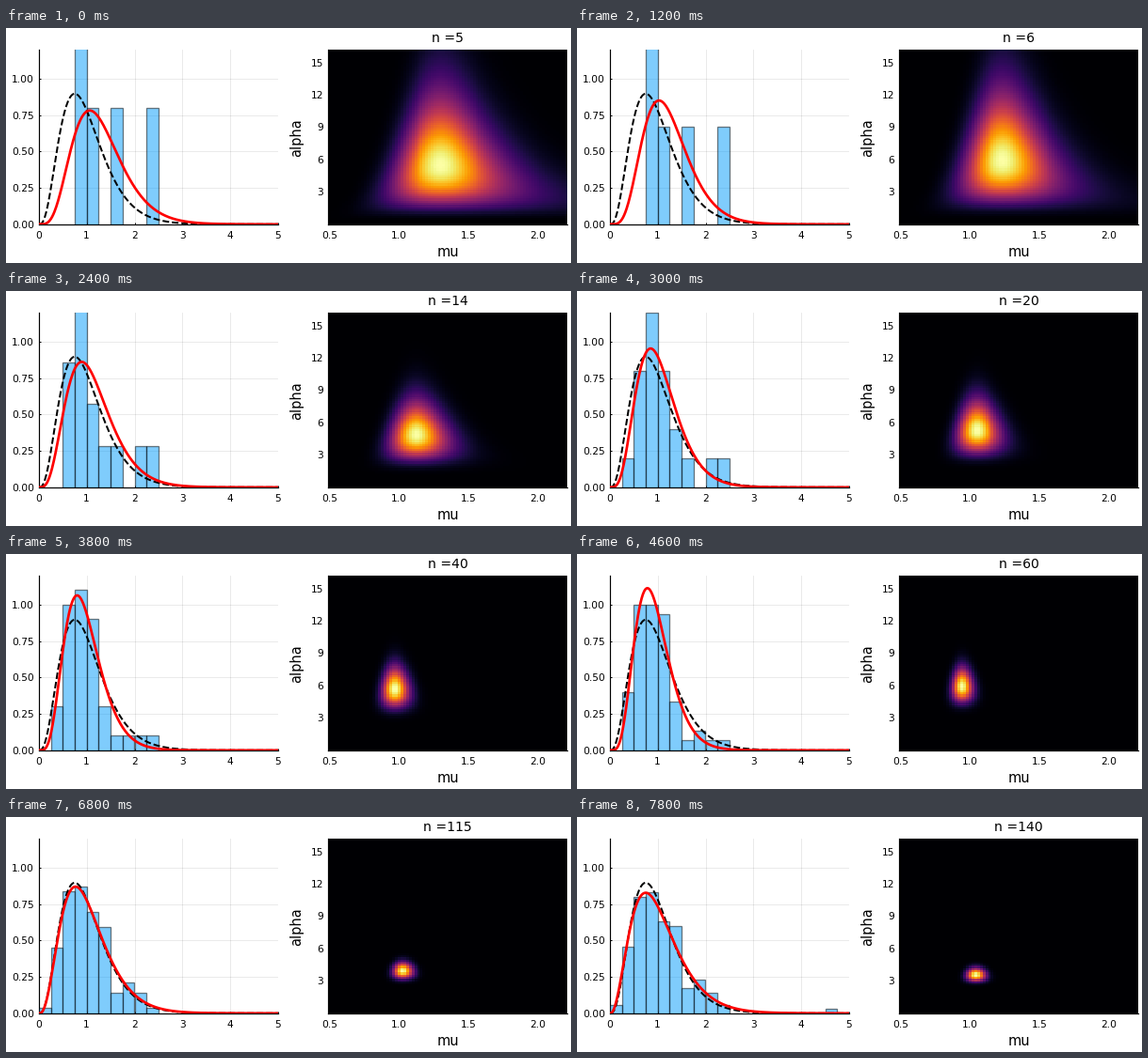
These frames come from a looping animation (600x250 px, 8 s). A matplotlib script:

```python
import math

import numpy as np
import matplotlib.pyplot as plt
from matplotlib.animation import FuncAnimation

W, H, DPI = 600, 250, 100
PX = 72 / DPI  # one pixel in points
TOP, BOTTOM = 22.8, 208.8
BIN, N_BINS = 0.25, 20

plt.rcParams["font.family"] = "DejaVu Sans"

# Key points of the fit: sample size, mean and shape
KEYS = [(5, 1.3, 5.5), (6, 1.235, 5.95), (10, 1.225, 4.7), (20, 1.05, 5.3),
        (60, 0.943, 5.95), (90, 1.004, 4.75), (140, 1.04, 3.57)]
KEY_N, KEY_MU, KEY_ALPHA = np.array(KEYS).T

SIZES = [5] * 6 + [*range(6, 10), *range(10, 20, 2), *range(20, 141, 5)]


def spread(added):
    """Order the new samples so that every bin fills at a steady pace."""
    times = [((k + 0.9) / c, b) for b, c in enumerate(added) for k in range(c)]
    return [b for _, b in sorted(times)]


def draw_samples():
    """Bin index of every sample: the first ten, then two even stretches."""
    first = [3, 3, 4, 6, 9, 3, 2, 3, 5, 8]
    early = spread([0, 6, 14, 11, 13, 4, 0, 2, 0, 0])
    late = spread([2, 10, 13, 14, 8, 16, 5, 6, 4, 1] + [0] * 8 + [1])
    return np.array(first + early + late)


def log_gap(alpha):
    """Approximate log(alpha) - digamma(alpha)."""
    return 1 / (2 * alpha) + 1 / (12 * alpha**2)


def sample_stats(n):
    """Mean of the first n samples, and log of it less the mean log."""
    mean = np.interp(n, KEY_N, KEY_N * KEY_MU) / n
    log_sums = KEY_N * (np.log(KEY_MU) - log_gap(KEY_ALPHA))
    return mean, math.log(mean) - np.interp(n, KEY_N, log_sums) / n


def gamma_pdf(x, mu, alpha):
    rate = alpha / mu
    log_c = alpha * math.log(rate) - math.lgamma(alpha)
    return x ** (alpha - 1) * np.exp(log_c - rate * x)


M = np.arange(86)[None, :] * 0.02 + 0.5
A = np.arange(81)[:, None] * 0.2 + 0.1
LOG_NORM = A * np.log(A) - np.vectorize(math.lgamma)(A)


def posterior(n, mean, gap):
    log_mean = math.log(mean) - gap
    log_l = n * (LOG_NORM - A * np.log(M) + A * log_mean - A * mean / M)
    return np.exp(log_l - log_l.max())


fig = plt.figure(figsize=(W / DPI, H / DPI), dpi=DPI, facecolor="white")


def add_axes(left, right):
    ax = fig.add_axes([left / W, 1 - BOTTOM / H, (right - left) / W, (BOTTOM - TOP) / H])
    ax.spines[["top", "right"]].set_visible(False)
    for side in ("left", "bottom"):
        ax.spines[side].set(linewidth=1.2 * PX, zorder=0.9)
    ax.tick_params(direction="in", length=2.5 * PX, width=PX, labelsize=10.67 * PX)
    ax.tick_params(axis="x", pad=6.8 * PX)
    ax.tick_params(axis="y", pad=4.8 * PX)
    return ax


def label(x, y, text, size, **kw):
    return fig.text(x / W, 1 - y / H, text, fontsize=size * PX, ha="center", **kw)


# Histogram and densities
ax = add_axes(34.9, 288.9)
ax.set(xlim=(0, 5), ylim=(0, 1.2), xticks=range(6), yticks=np.arange(5) / 4)
ax.yaxis.set_major_formatter("{x:.2f}")
ax.grid(color="black", alpha=0.1, linewidth=0.8 * PX)
ax.set_axisbelow(True)

bars = ax.bar(np.arange(N_BINS) * BIN, np.zeros(N_BINS), BIN, align="edge",
              facecolor=(0, 0.604, 0.98, 0.5), edgecolor=(0, 0, 0, 0.5),
              linewidth=1.3 * PX, zorder=2)
xs = np.linspace(0, 5, 400)
ax.plot(xs, gamma_pdf(xs, 1, 4), color="black", linewidth=2 * PX,
        dashes=(3.5, 1.5), dash_capstyle="butt", zorder=3)
fit, = ax.plot(xs, 0 * xs, color="red", linewidth=2.7 * PX, zorder=4)

# Posterior heat map
heat = add_axes(341.9, 595.9)
image = heat.imshow(0 * A * M, cmap="inferno", vmin=0, vmax=1,
                    origin="lower", aspect="auto", interpolation="nearest",
                    extent=(0.49, 2.21, 0, 16.2))
heat.set(xticks=np.arange(1, 5) / 2, yticks=range(3, 16, 3))
label(469, 243, "mu", 14.67, va="baseline")
label(308.5, 116.3, "alpha", 14.67, va="center", rotation=90)
title = label(469, 15, "", 14, va="baseline")

samples = draw_samples()


def update(i):
    n = SIZES[i]
    mean, gap = sample_stats(n)
    alpha = (3 + math.sqrt(9 + 12 * gap)) / (12 * gap)
    counts = np.bincount(samples[:n], minlength=N_BINS)
    for bar, count in zip(bars, counts):
        bar.set_height(count / (n * BIN))
        bar.set_visible(count > 0)
    fit.set_ydata(gamma_pdf(xs, mean, alpha))
    image.set_data(posterior(n, mean, gap))
    title.set_text(f"n ={n}")
    return [*bars, fit, image, title]


anim = FuncAnimation(fig, update, frames=len(SIZES), interval=200,
                     repeat=True, repeat_delay=0, blit=False)
plt.show()
```
